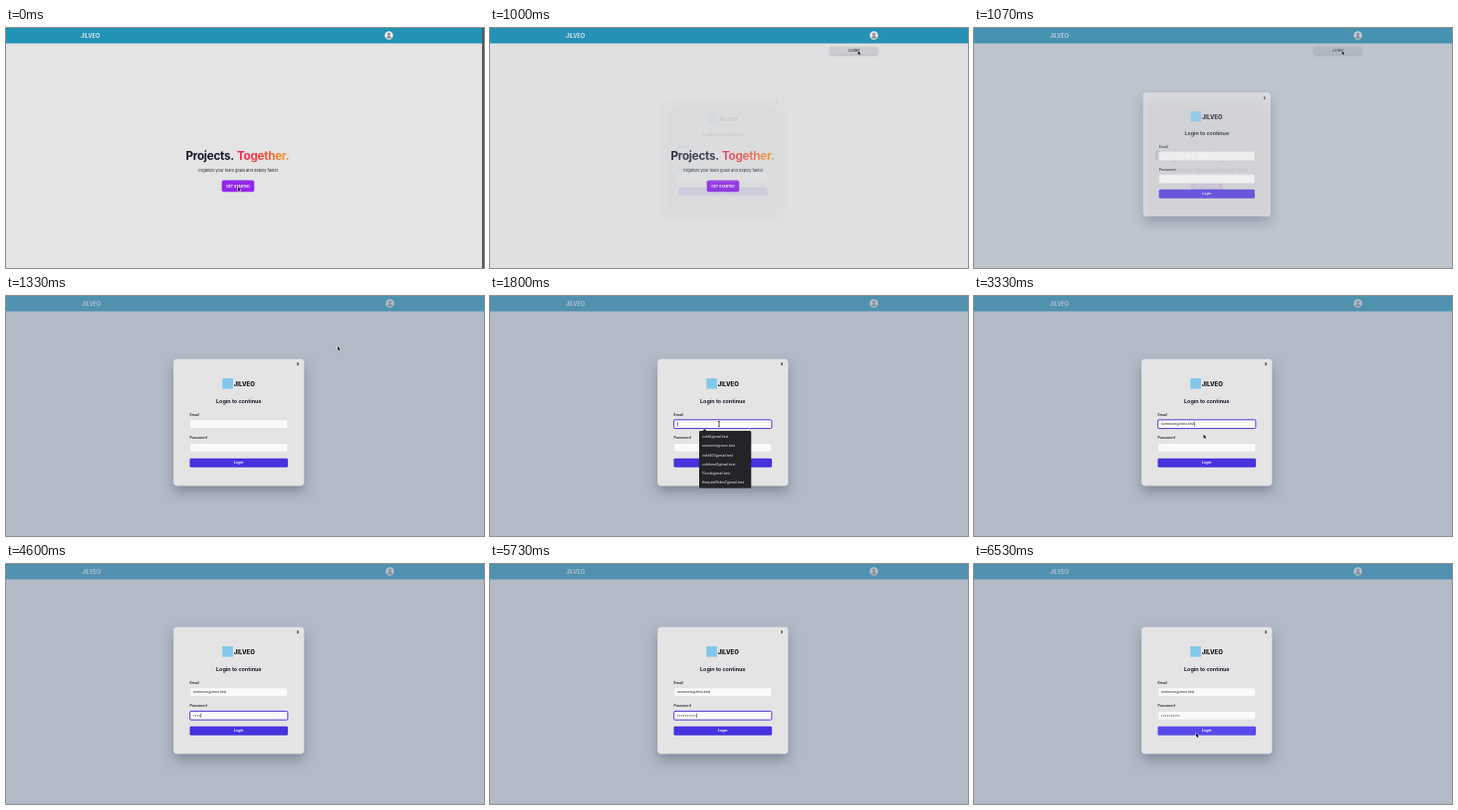
Write an HTML page with a canvas that moves like this. It is 480x242 px and loops after 8000 ms.

```html
<!DOCTYPE html>
<html lang="en">
<head>
<meta charset="utf-8">
<title>Login demo</title>
<style>
html, body { margin: 0; width: 100%; height: 100%; overflow: hidden; background: #e4e4e4; }
canvas { display: block; width: 480px; height: 242px; }
</style>
</head>
<body>
<canvas id="stage"></canvas>
<script>
const LOOP = 8000;
const BRAND = 'JILVEO', EMAIL = 'someone@moo.test';
const SUGGESTIONS = ['vokt5@mail.test', EMAIL, 'vokt404@mail.test',
  'voktlane3@mail.test', '10vokt@mail.test', 'thequietRobin7@mail.test'];
const KEY_TIMES = [4200, 4330, 4470, 4600, 4730, 4870, 5070, 5270, 5530, 5730];
// time, x, y
const POINTER = [[70, 233, 160], [620, 385, 7], [690, 385, 7], [870, 369.5, 23],
  [1130, 369.5, 23], [1730, 230, 129], [2870, 230, 129], [3130, 230.5, 139.5],
  [3470, 230.5, 139.5], [4130, 231, 153], [6130, 231, 153], [6530, 223, 170.5]];

const canvas = document.getElementById('stage');
const ctx = canvas.getContext('2d');
const dpr = window.devicePixelRatio || 1;
canvas.width = 480 * dpr;
canvas.height = 242 * dpr;

const clamp = x => Math.min(1, Math.max(0, x));
const ramp = (t, from, to) => clamp((t - from) / (to - from));
const smooth = x => x * x * (3 - 2 * x);
const easeOut = x => 1 - (1 - x) ** 3;

function rect(x, y, w, h, fill, r = 0, stroke) {
  ctx.beginPath();
  ctx.roundRect(x, y, w, h, r);
  ctx.fillStyle = fill;
  ctx.fill();
  if (stroke) {
    ctx.strokeStyle = stroke;
    ctx.lineWidth = 1;
    ctx.stroke();
  }
}

function disc(x, y, r, fill) {
  ctx.beginPath();
  ctx.arc(x, y, r, 0, 2 * Math.PI);
  ctx.fillStyle = fill;
  ctx.fill();
}

// y is the middle of the capitals
function text(str, x, y, size, fill, weight = 400, align = 'left', spacing = 0) {
  ctx.font = `${weight} ${size}px Inter, sans-serif`;
  ctx.letterSpacing = spacing + 'px';
  ctx.textAlign = align;
  ctx.fillStyle = fill;
  ctx.fillText(str, x, y + size * 0.36);
  return ctx.measureText(str).width;
}

function shadow(color, blur = 0, dy = 0) {
  ctx.shadowColor = color;
  ctx.shadowBlur = blur * dpr;
  ctx.shadowOffsetY = dy * dpr;
}

function drawPage(t) {
  rect(0, 0, 480, 242, '#e4e4e4');
  rect(0, 0, 480, 15.5, '#2092b5');
  if (t < 930) rect(478, 0, 2, 242, '#555');

  ctx.save();
  if (t >= 930) ctx.translate(1, 0);
  text(BRAND, 75, 7.7, 5.6, '#eef4f6', 600);

  disc(384.5, 7.5, 4.2, '#ebebeb');
  disc(384.5, 6.3, 1.5, '#8d8584');
  ctx.beginPath();
  ctx.arc(384.5, 10.6, 2.5, Math.PI, 0);
  ctx.fill();

  text('Projects.', 180.5, 128.8, 11.7, '#141c2c', 700, 'left', -0.29);
  const fire = ctx.createLinearGradient(232, 0, 285, 0);
  fire.addColorStop(0, '#ec2457');
  fire.addColorStop(0.45, '#f3473f');
  fire.addColorStop(1, '#f6a623');
  text('Together.', 232, 128.8, 11.7, fire, 700, 'left', -0.29);
  text('Organize your team goals and deploy faster', 233, 143.8, 3.9, '#1c2230', 400, 'center');
  rect(216.7, 153.4, 32.6, 11.9, '#9327ea', 2);
  text('GET STARTED', 233, 159.4, 3.45, '#fff', 700, 'center');

  const menu = ramp(t, 650, 720) * (1 - ramp(t, 1130, 1270));
  if (menu) {
    ctx.globalAlpha = menu;
    shadow('rgba(0,0,0,.25)', 2, 0.8);
    rect(340, 19, 48.5, 7.7, t > 780 ? '#cdcfd0' : '#e2e2e2', 1.5);
    shadow('transparent');
    text('LOGIN', 364.5, 23, 3.4, '#20242c', 600, 'center');
  }
  ctx.restore();
}

function drawField(y, focused) {
  rect(184.7, y, 98.2, 8.8, '#fafafa', 1.2, focused ? '#4b3bd6' : '#e0e0e2');
}

function caret(x, y) {
  rect(x, y - 2.3, 0.5, 4.6, '#222');
}

function drawModal(t) {
  const p = easeOut(ramp(t, 995, 1195));
  if (!p) return;
  ctx.save();
  ctx.globalAlpha = p;
  rect(0, 0, 480, 242, 'rgba(130,146,172,.5)');

  const scale = 0.9 + 0.1 * p;
  ctx.translate(233.8, 127.5);
  ctx.scale(scale, scale);
  ctx.translate(-233.8, -127.5);
  shadow('rgba(40,50,75,.35)', 12, 6);
  rect(168.2, 63.5, 131.2, 128, '#e4e4e4', 3.9);
  shadow('transparent');

  text('x', 293.2, 68.9, 4, '#222', 700, 'center');
  rect(217.3, 83, 10.6, 10.6, '#83c8eb');
  text(BRAND, 228.8, 88.7, 6, '#16181c', 800);
  text('Login to continue', 233.8, 105.7, 5.4, '#161b28', 700, 'center');
  text('Email', 184.6, 119.5, 3.6, '#222733', 600);
  text('Password', 184.6, 143, 3.6, '#222733', 600);

  const inEmail = t >= 1800 && t < 4130;
  drawField(124.8, inEmail);
  const typed = t >= 3070 ? EMAIL : t >= 2130 ? EMAIL[0] : '';
  const end = 188 + text(typed, 188, 129.1, 3.52, '#20242c');
  if (inEmail) caret(end, 129.1);

  const inPassword = t >= 4130 && t < 6400;
  drawField(148.4, inPassword);
  const count = KEY_TIMES.filter(k => t >= k).length;
  for (let i = 0; i < count; i++) disc(188.8 + 1.9 * i, 152.9, 0.55, '#4a4c52');
  if (inPassword) caret(188 + 1.9 * count, 152.8);

  rect(184.5, 163.7, 98.6, 9.1, t >= 1000 && t < 6400 ? '#4633dd' : '#5849ea', 1.4);
  text('Login', 233.8, 168.2, 3.5, '#fff', 700, 'center');
  ctx.restore();
}

function drawSuggestions(t) {
  if (t < 1800 || t >= 3270) return;
  const list = t < 2130 ? SUGGESTIONS : [EMAIL];
  ctx.beginPath();
  ctx.moveTo(213, 136.5);
  ctx.lineTo(215.5, 134);
  ctx.lineTo(218, 136.5);
  ctx.fillStyle = '#242428';
  ctx.fill();
  rect(210, 136, 52.3, list.length * 9.3 + 2, '#242428', 1.2);
  if (t >= 3070) rect(210.5, 137.5, 51.3, 8.8, '#44454c', 1);
  list.forEach((name, i) => text(name, 213, 141.9 + 9.25 * i, 3.5, '#f0f0f0'));
}

function drawPointer(t) {
  if ((t > 2070 && t < 2870) || (t > 4200 && t < 6130)) return;
  let i = POINTER.findIndex(k => k[0] > t);
  if (i < 0) i = POINTER.length - 1;
  const b = POINTER[i], a = POINTER[Math.max(0, i - 1)];
  const p = a === b ? 1 : smooth(ramp(t, a[0], b[0]));
  const x = a[1] + (b[1] - a[1]) * p, y = a[2] + (b[2] - a[2]) * p;

  const overText = (t > 1700 && t < 2900) || (t > 4000 && t < 6200);
  if (overText) {
    rect(x - 0.4, y - 2.5, 0.8, 5, '#222');
    rect(x - 1.1, y - 2.7, 2.2, 0.6, '#222');
    rect(x - 1.1, y + 2.1, 2.2, 0.6, '#222');
    return;
  }
  ctx.beginPath();
  [[0, 0], [0, 4], [0.9, 3.3], [1.6, 4.7], [2.3, 4.4], [1.7, 3], [2.9, 2.9]]
    .forEach(([dx, dy]) => ctx.lineTo(x + dx, y + dy));
  ctx.closePath();
  ctx.strokeStyle = '#fff';
  ctx.lineWidth = 0.9;
  ctx.stroke();
  ctx.fillStyle = '#111';
  ctx.fill();
}

function frame(now) {
  const t = now % LOOP;
  ctx.setTransform(dpr, 0, 0, dpr, 0, 0);
  drawPage(t);
  drawModal(t);
  drawSuggestions(t);
  drawPointer(t);
  requestAnimationFrame(() => frame(performance.now() - start));
}
const start = performance.now();
frame(0);
</script>
</body>
</html>
```
